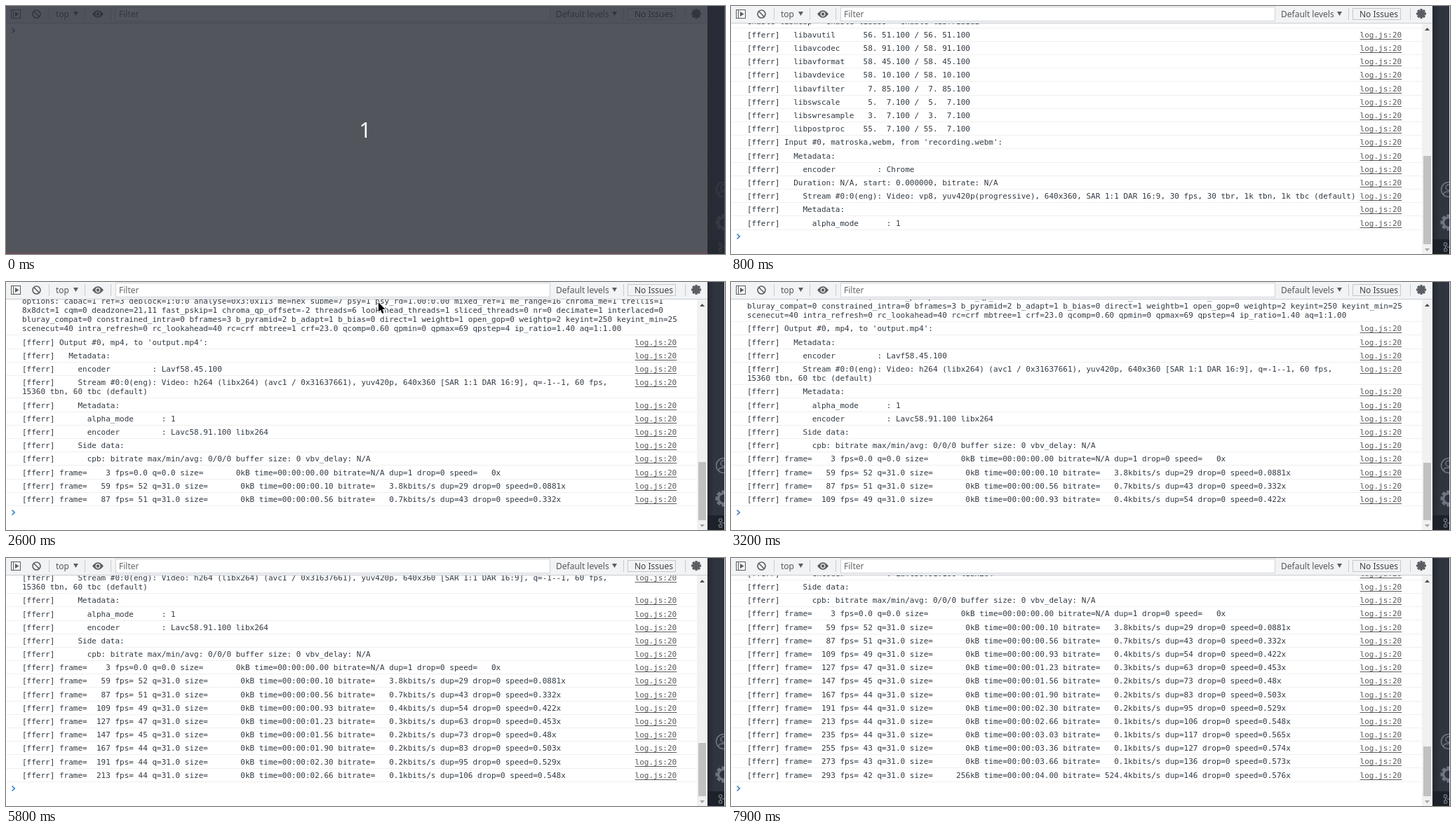
An HTML page with a canvas for the animation above (8 s loop, 1025 by 354 pixels).

```html
<!DOCTYPE html>
<html lang="en">
<head>
<meta charset="utf-8">
<title>Console log</title>
<style>
  html, body { margin: 0; width: 100%; height: 100%; overflow: hidden; background: #fff; }
  canvas { display: block; }
</style>
</head>
<body>
<canvas id="stage" width="1025" height="354"></canvas>
<script>
const ctx = document.getElementById('stage').getContext('2d');
const LOOP = 8000;
const MONO = '11px "DejaVu Sans Mono", monospace';
const SANS = '12px "Noto Sans", "Open Sans", sans-serif';
const CHAR = 6.6226, LINE = 13.1875, PAD = 6, TOP = 25, VIEW = 329, FOOT = 34.4;

const flags = '-s USE_PTHREADS=1 -s INVOKE_RUN=0 -s EXIT_RUNTIME=1 -s MODULARIZE=1 ' +
  '-s EXPORT_NAME=createFFmpegCore -s INITIAL_MEMORY=1073741824 -s PROXY_TO_PTHREAD=1 ' +
  '-I/src/build/include -O3 --closure 1';
const enable = names => names.split(' ').map(n => '--enable-' + n).join(' ');
const config = '  configuration: --target-os=none --arch=x86_32 --enable-cross-compile --disable-x86asm ' +
  '--disable-inline-asm --disable-stripping --disable-programs --disable-doc --disable-debug ' +
  `--disable-runtime-detect --disable-autodetect --extra-cflags='${flags}' --extra-cxxflags='${flags}' ` +
  `--extra-ldflags='${flags} -L/src/build/lib' --pkg-config-flags=--static --nm=llvm-nm --ar=emar ` +
  '--as=llvm-as --ranlib=llvm-ranlib --cc=emcc --cxx=em++ --objcc=emcc --dep-cc=emcc ' +
  enable('gpl nonfree zlib libx264 libx265 libvpx wavpack libmp3lame libfdk-aac libtheora ' +
    'libvorbis libfreetype libopus') + ' --\nenable-libwebp --enable-libass --enable-libfribidi';

const info = lines => lines.map(s => '[info] ' + s);
const err = lines => lines.map(s => '[fferr] ' + s);
const fetched = (name, size) => [
  `fetch ${name} from https://unpkg.com/@ffmpeg/core@0.8.5/dist/${name}`,
  `${name} file size = ${size} KB`,
  `${name} blob URL = blob:http://localhost:3000/${name}`];

const lib = (name, a, b) => {
  const v = `${String(a).padStart(2)}.${String(b).padStart(3)}.100`;
  return `  ${name.padEnd(15)}${v} / ${v}`;
};
const field = (depth, key, value) => ' '.repeat(depth) + key.padEnd(16) + ': ' + value;

const progress = (frame, fps, time, rate, dup, speed, size = 0) =>
  err([`frame=${String(frame).padStart(5)} fps=${fps} q=${frame > 3 ? '31.0' : '0.0'} ` +
    `size=${String(size).padStart(8)}kB time=00:00:0${time} ` +
    `bitrate=${rate === 'N/A' ? rate : rate.padStart(6) + 'kbits/s'} dup=${dup} drop=0 speed=${speed}x`]);

// Each batch: arrival time in ms, then the rows it adds.
const batches = [
  [300, info(['load ffmpeg-core', 'loading ffmpeg-core', ...fetched('ffmpeg-core.js', 112)])],
  [400, info([...fetched('ffmpeg-core.wasm', 23594), ...fetched('ffmpeg-core.worker.js', 3)])],
  [500, info(['ffmpeg-core loaded', 'run FS.writeFile recording.webm <178432 bytes binary file>'])],
  [700, [...info(['run ffmpeg command: -i recording.webm -r 60 output.mp4']), ...err([
    'ffmpeg version v0.8.5 Copyright (c) 2000-2020 the FFmpeg developers',
    '  built with emcc (Emscripten gcc/clang-like replacement) 2.0.8 (d059fd603d0b45b584f634dc2365bc9e9a6ec1dd)',
    config])]],
  [800, err([
    lib('libavutil', 56, 51), lib('libavcodec', 58, 91), lib('libavformat', 58, 45),
    lib('libavdevice', 58, 10), lib('libavfilter', 7, 85), lib('libswscale', 5, 7),
    lib('libswresample', 3, 7), lib('libpostproc', 55, 7),
    "Input #0, matroska,webm, from 'recording.webm':", '  Metadata:', field(4, 'encoder', 'Chrome'),
    '  Duration: N/A, start: 0.000000, bitrate: N/A',
    '    Stream #0:0(eng): Video: vp8, yuv420p(progressive), 640x360, SAR 1:1 DAR 16:9, 30 fps, 30 tbr, 1k tbn, 1k tbc (default)',
    '    Metadata:', field(6, 'alpha_mode', '1')])],
  [900, err(['Stream mapping:', '  Stream #0:0 -> #0:0 (vp8 (native) -> h264 (libx264))',
    'Press [q] to stop, [?] for help'])],
  [1400, err([
    '[libx264 @ 0x1a6c0c0] using cpu capabilities: none!',
    '[libx264 @ 0x1a6c0c0] profile High, level 3.1, 4:2:0, 8-bit',
    '[libx264 @ 0x1a6c0c0] 264 - core 160 - H.264/MPEG-4 AVC codec - Copyleft 2003-2020 - http://www.videolan.org/x264.html -\n' +
    'options: cabac=1 ref=3 deblock=1:0:0 analyse=0x3:0x113 me=hex subme=7 psy=1 psy_rd=1.00:0.00 mixed_ref=1 me_range=16 chroma_me=1 trellis=1\n' +
    '8x8dct=1 cqm=0 deadzone=21,11 fast_pskip=1 chroma_qp_offset=-2 threads=6 lookahead_threads=1 sliced_threads=0 nr=0 decimate=1 interlaced=0\n' +
    'bluray_compat=0 constrained_intra=0 bframes=3 b_pyramid=2 b_adapt=1 b_bias=0 direct=1 weightb=1 open_gop=0 weightp=2 keyint=250 keyint_min=25\n' +
    'scenecut=40 intra_refresh=0 rc_lookahead=40 rc=crf mbtree=1 crf=23.0 qcomp=0.60 qpmin=0 qpmax=69 qpstep=4 ip_ratio=1.40 aq=1:1.00',
    "Output #0, mp4, to 'output.mp4':", '  Metadata:', field(4, 'encoder', 'Lavf58.45.100'),
    '    Stream #0:0(eng): Video: h264 (libx264) (avc1 / 0x31637661), yuv420p, 640x360 [SAR 1:1 DAR 16:9], q=-1--1, 60 fps,\n15360 tbn, 60 tbc (default)',
    '    Metadata:', field(6, 'alpha_mode', '1'), field(6, 'encoder', 'Lavc58.91.100 libx264'),
    '    Side data:', '      cpb: bitrate max/min/avg: 0/0/0 buffer size: 0 vbv_delay: N/A'])],
  [1500, progress(3, '0.0', '0.00', 'N/A', 1, '   0')],
  [2100, progress(59, ' 52', '0.10', '3.8', 29, '0.0881')],
  [2600, progress(87, ' 51', '0.56', '0.7', 43, '0.332')],
  [3200, progress(109, ' 49', '0.93', '0.4', 54, '0.422')],
  [3600, progress(127, ' 47', '1.23', '0.3', 63, '0.453')],
  [4100, progress(147, ' 45', '1.56', '0.2', 73, '0.48')],
  [4700, progress(167, ' 44', '1.90', '0.2', 83, '0.503')],
  [5200, progress(191, ' 44', '2.30', '0.2', 95, '0.529')],
  [5800, progress(213, ' 44', '2.66', '0.1', 106, '0.548')],
  [6200, progress(235, ' 44', '3.03', '0.1', 117, '0.565')],
  [6800, progress(255, ' 43', '3.36', '0.1', 127, '0.574')],
  [7300, progress(273, ' 43', '3.66', '0.1', 136, '0.573')],
  [7900, progress(293, ' 42', '4.00', '524.4', 146, '0.576', 256)],
];

// The first line leaves room for the link on the right.
function wrap(text) {
  const lines = [];
  for (const part of text.split('\n')) {
    let line = '';
    for (const word of part.split(/(?<=[ -])/)) {
      if ((line + word).trimEnd().length > (lines.length ? 141 : 131)) {
        lines.push(line);
        line = '';
      }
      line += word;
    }
    lines.push(line);
  }
  return lines;
}

const rows = [];
let height = 0;
for (const [time, texts] of batches) {
  for (const text of texts) {
    const lines = wrap(text);
    rows.push({ time, lines, top: height, counter: text.includes('frame=') });
    height += lines.length * LINE + PAD;
  }
}

// Pointer positions by time; null hides it.
const pointer = [
  [0, null], [1200, [667, 30]], [1400, [671, 20]], [1500, [676, 11]], [1600, [675, 8]],
  [1700, [670, 9]], [1900, [659, 20]], [2000, [600, 26]], [2100, [531, 29]],
  [2900, [542, 15]], [3000, null],
];

function box(color, x, y, w, h) {
  ctx.fillStyle = color;
  ctx.fillRect(x, y, w, h);
}

function poly(points, color) {
  ctx.beginPath();
  points.forEach(([x, y]) => ctx.lineTo(x, y));
  ctx.closePath();
  ctx.fillStyle = color;
  ctx.fill();
}

function ring(x, y, r, color, width) {
  ctx.beginPath();
  ctx.arc(x, y, r, 0, Math.PI * 2);
  ctx.strokeStyle = color;
  ctx.lineWidth = width;
  ctx.stroke();
}

function stroke(points, color, width) {
  ctx.beginPath();
  points.forEach(([x, y]) => ctx.lineTo(x, y));
  ctx.strokeStyle = color;
  ctx.lineWidth = width;
  ctx.stroke();
}

function label(text, x, y, color, font = SANS) {
  ctx.font = font;
  ctx.fillStyle = color;
  ctx.fillText(text, x, y);
}

function gear(x, y, r, color, hole) {
  ctx.save();
  ctx.translate(x, y);
  for (let i = 0; i < 4; i++) {
    box(color, -r * 0.24, -r, r * 0.48, r * 2);
    ctx.rotate(Math.PI / 4);
  }
  ctx.restore();
  ring(x, y, r * 0.55, color, r * 0.42);
  if (hole) {
    ctx.beginPath();
    ctx.arc(x, y, r * 0.5, 0, 7);
    ctx.fillStyle = hole;
    ctx.fill();
  }
}

function drawToolbar() {
  const ink = '#5b5f64';
  box('#f1f3f4', 0, 0, 1000, 24);
  box('#cacdd1', 0, 24, 1000, 1);
  ctx.strokeStyle = ink;
  ctx.lineWidth = 1;
  ctx.strokeRect(7.5, 5.5, 13, 12);
  box(ink, 10, 6, 1, 11);
  poly([[13, 8], [18.5, 11.5], [13, 15]], ink);
  ring(43.5, 11.5, 5.5, ink, 1.6);
  stroke([[39.5, 7.5], [47.5, 15.5]], ink, 1.6);
  for (const x of [61, 112, 149, 880, 968]) box('#cacdd1', x, 3, 1, 17);
  label('top', 71, 16, '#55595e');
  poly([[96, 8], [103, 8], [99.5, 14]], ink);
  ctx.beginPath();
  ctx.moveTo(123, 11.5);
  ctx.quadraticCurveTo(131, 1, 139, 11.5);
  ctx.quadraticCurveTo(131, 22, 123, 11.5);
  ctx.fillStyle = ink;
  ctx.fill();
  ring(131, 11.5, 2.8, '#f1f3f4', 1.2);
  box('#fff', 156, 2, 619, 19);
  ctx.strokeStyle = '#d5d8db';
  ctx.strokeRect(156.5, 1.5, 619, 20);
  label('Filter', 161, 16, '#666');
  label('Default levels', 784, 16, '#55595e');
  poly([[864, 8], [871, 8], [867.5, 14]], ink);
  ctx.lineWidth = 1;
  ctx.strokeStyle = '#c6c9cd';
  ctx.strokeRect(886.5, 3.5, 68, 16);
  label('No Issues', 896, 16, '#3c4043');
  gear(984, 11, 7, ink);
}

function drawSidebar() {
  const shade = ctx.createLinearGradient(1000, 0, 1010, 0);
  shade.addColorStop(0, '#252932');
  shade.addColorStop(1, '#2f343f');
  box(shade, 1000, 0, 25, 354);
  box('#1d2129', 1000, 333, 25, 21);
  const ink = '#6f747f';
  ring(1023, 262, 10.5, ink, 1.6);
  ring(1023, 259, 4, ink, 1.5);
  stroke([[1015, 269], [1018, 265.5], [1024, 265]], ink, 1.5);
  gear(1023, 309, 11.5, ink, '#2f343f');
  ring(1018.5, 340, 2.2, ink, 1.3);
  ring(1018.5, 348, 2.2, ink, 1.3);
  stroke([[1018.5, 342], [1018.5, 346]], ink, 1.3);
  stroke([[1020.5, 344], [1024, 344]], ink, 1.3);
  box('#e4e5e7', 1024, 0, 1, 354);
}

function drawScrollbar(content) {
  box('#f1f1f1', 985, TOP, 15, VIEW);
  const thumb = Math.round(300 * VIEW / content);
  box('#c1c1c1', 987, 340 - thumb, 11, thumb);
  poly([[989, 35], [996, 35], [992.5, 31]], '#505050');
  poly([[989, 346], [996, 346], [992.5, 350]], '#a3a3a3');
}

function drawLine(text, x, y) {
  label(text, x, y, '#303942', MONO);
  const url = text.match(/http:\/\/www\S+/);
  if (url) box('#545b63', x + url.index * CHAR, y + 2, url[0].length * CHAR, 1);
}

function drawLog(t) {
  const shown = rows.filter(r => r.time <= t);
  const last = shown[shown.length - 1];
  const total = last ? last.top + last.lines.length * LINE + PAD : 0;
  const scrolled = total + FOOT > VIEW;
  const counters = shown.filter(r => r.counter).length;
  const phase = counters ? 1 - 0.027 * counters : 0.56;
  const shift = scrolled ? 313 + phase - (total - LINE - PAD) : TOP + 13.6;
  const right = scrolled ? 985 : 1000;

  ctx.save();
  ctx.beginPath();
  ctx.rect(0, TOP, 1000, VIEW);
  ctx.clip();
  let base = 24;
  for (const row of shown) {
    const first = Math.round(row.top + shift);
    row.lines.forEach((text, i) => {
      base = Math.round(row.top + shift + i * LINE);
      if (base > 15) drawLine(text, 23, base);
    });
    label('log.js:20', right - 88.4, first, '#5a5a5a', MONO);
    box('#5a5a5a', right - 88.4, first + 2, 9 * CHAR, 1);
    box('#f0f0f0', 0, base + 5, right, 1);
  }
  const y = last ? base + 15 : 35;
  stroke([[8.5, y - 3.5], [12.3, y], [8.5, y + 3.5]], '#367cc1', 1.6);
  ctx.restore();
  if (scrolled) drawScrollbar(total + FOOT);
}

function drawPointer(t) {
  const at = pointer.filter(p => p[0] <= t).pop()[1];
  if (!at) return;
  ctx.save();
  ctx.translate(...at);
  const shape = [[0, 0], [0, 13.5], [3, 10.8], [5.3, 16], [7.6, 15], [5.4, 10], [9.5, 9.8]];
  stroke([...shape, shape[0]], '#fff', 2);
  poly(shape, '#000');
  ctx.restore();
}

function drawCountdown() {
  box('rgba(39,43,52,.8)', 0, 0, 1025, 354);
  box('#64505a', 0, 351, 1000, 3);
  ctx.textAlign = 'center';
  label('1', 512, 188, '#fff', '30px "Noto Sans", "Open Sans", sans-serif');
  ctx.textAlign = 'left';
}

const start = performance.now();
function render() {
  const t = (performance.now() - start) % LOOP;
  box('#fff', 0, 0, 1025, 354);
  drawLog(t);
  drawToolbar();
  drawSidebar();
  drawPointer(t);
  if (t < 100) drawCountdown();
  requestAnimationFrame(render);
}
render();
</script>
</body>
</html>
```
